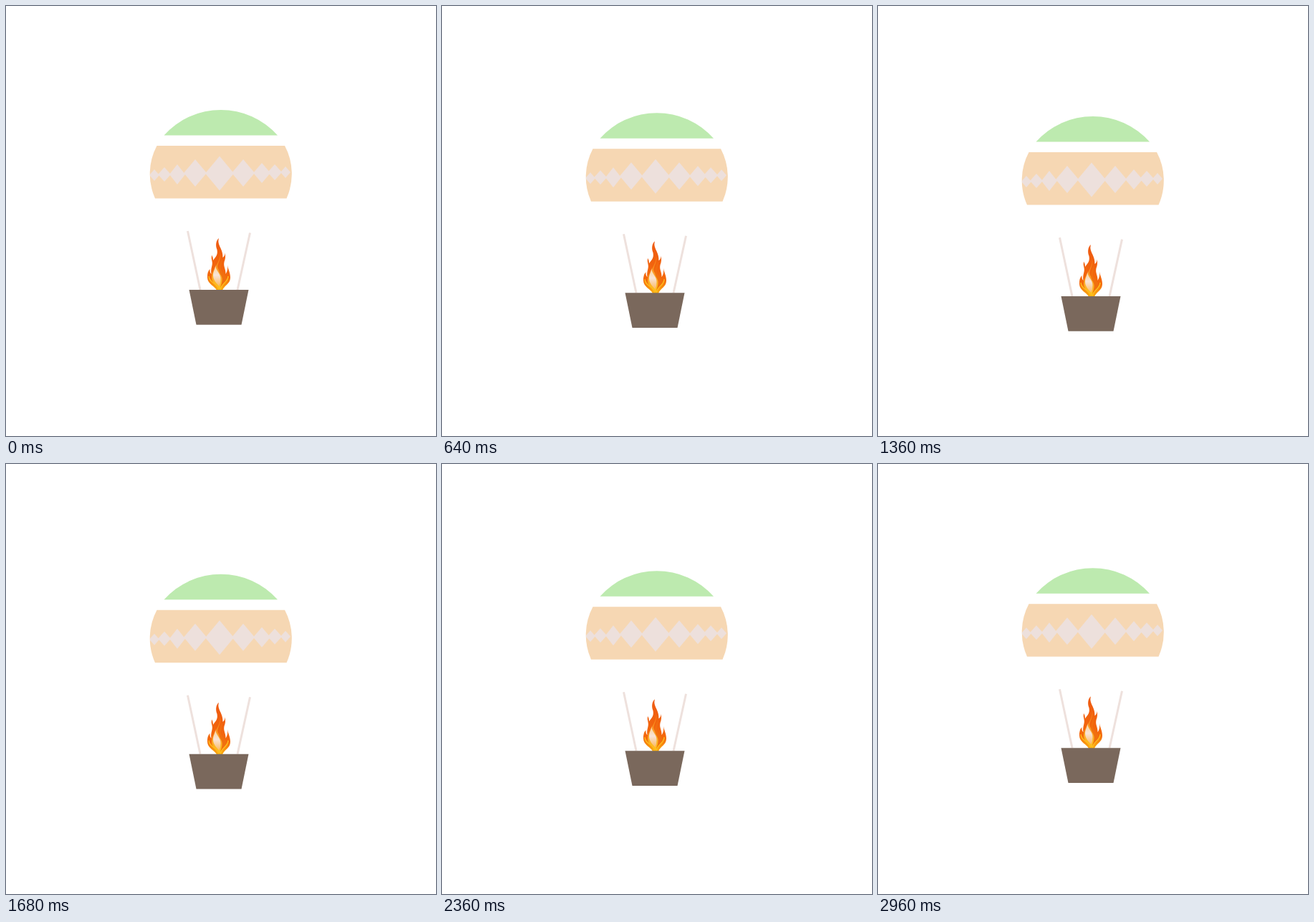
An HTML page that plays this animation: 600x600 px, repeating every 3000 ms.

```html
<!DOCTYPE html>
<html lang="en">
<head>
<meta charset="utf-8">
<title>Balloon</title>
<style>
  html, body { margin: 0; width: 100%; height: 100%; overflow: hidden; background: #fff; }
  svg { display: block; width: 100vw; height: 100vh; }
</style>
</head>
<body>
<svg viewBox="0 0 600 600">
  <defs>
    <linearGradient id="fire" x1="0" y1="0" x2="0" y2="1">
      <stop offset="0" stop-color="#ee5a12"/>
      <stop offset=".75" stop-color="#f4690b"/>
      <stop offset="1" stop-color="#fcb012"/>
    </linearGradient>
    <linearGradient id="glow" x1="0" y1="0" x2="0" y2="1">
      <stop offset="0" stop-color="#f5780f"/>
      <stop offset=".5" stop-color="#faa02c"/>
      <stop offset="1" stop-color="#fdc51c"/>
    </linearGradient>
    <linearGradient id="core" x1="0" y1="0" x2="0" y2="1">
      <stop offset="0" stop-color="#fcd08a"/>
      <stop offset=".5" stop-color="#f8e4d8"/>
      <stop offset="1" stop-color="#fbb860"/>
    </linearGradient>
    <clipPath id="bandClip">
      <path id="bandShape" d="M210.5 195H389A84 84 0 0 1 391.5 268.5H208A84 84 0 0 1 210.5 195Z"/>
    </clipPath>
  </defs>
  <g id="balloon">
    <path fill="#bdeaaf" d="M220.5 180.500A106 106 0 0 1 379 180.500Z"/>
    <use href="#bandShape" fill="#f6d7b3"/>
    <path id="diamonds" fill="#ede0dc" clip-path="url(#bandClip)"/>
    <path d="M253.5 314L271 396M340.5 316.5L323 396" stroke="#eee1dd" stroke-width="3"/>
    <g id="flame">
      <path fill="url(#fire)" d="M297 324C294 334 303 338 302.500 351Q305.500 349 305.500 344.500Q307 351 304.500 357C303 364 307 367 306.500 374Q310 369 309 361.500C310 368 313 372 313 379C313 388 304 390 302 397H294C292 391 281 388 281 379Q280.500 371 284.500 367Q284 372 286.500 374C285 366 289 362 287.500 356Q286 352 287 347.500Q289 350 289 355C292 350 296 348 294.500 340C292 334 293 327 297 324Z"/>
      <path fill="url(#glow)" d="M299 345C301 353 294 360 295.500 365C297 371 304 374 304 382Q304 389 299 396C294 390 287 386 287 378C287 368 299 358 299 345Z"/>
      <path fill="#f0700f" d="M300 352C303 360 298 363 300 368C303 374 308 376 307 381Q305 388 299 393C302 384 303 380 299 374C294 366 301 360 300 352Z"/>
      <path fill="url(#core)" d="M292.500 360C291 368 300 373 299.500 381Q299.500 387 297.500 391C293 386 289 382 289 376C289 370 292 367 292.500 360Z"/>
      <path fill="none" stroke="#fdbc1c" stroke-width="1.500" d="M283 377C283 386 294 386 297 396M310 377C310 386 301 386 299 396"/>
    </g>
    <path fill="#7a685c" d="M255.500 396H338.500L328.500 444.700H265.500Z"/>
  </g>
</svg>
<script>
const LOOP = 3000, STEP = 40, DROP = 10;
const balloon = document.getElementById("balloon");

// center x, center y, half width, half height
const diamonds = [
  [207, 236, 7, 8], [221, 235, 9, 10], [239, 235, 11, 14], [264, 233, 16, 19],
  [298, 233.5, 20, 24],
  [331, 233, 16, 19], [357, 233, 12, 14], [375, 232, 10, 11], [390, 232, 7, 8]
];
document.getElementById("diamonds").setAttribute("d", diamonds.map(
  ([x, y, w, h]) => `M${x - w} ${y}L${x} ${y - h}L${x + w} ${y}L${x} ${y + h}Z`
).join(""));

// The balloon sinks and rises at constant speed.
function draw(time) {
  const t = Math.floor((time % LOOP) / STEP) * STEP;
  const low = 1 - Math.abs(1 - t / (LOOP / 2));
  balloon.setAttribute("transform", `translate(0 ${(low * DROP).toFixed(3)})`);
}

const start = performance.now();
function tick() {
  draw(performance.now() - start);
  requestAnimationFrame(tick);
}
tick();
</script>
</body>
</html>
```
